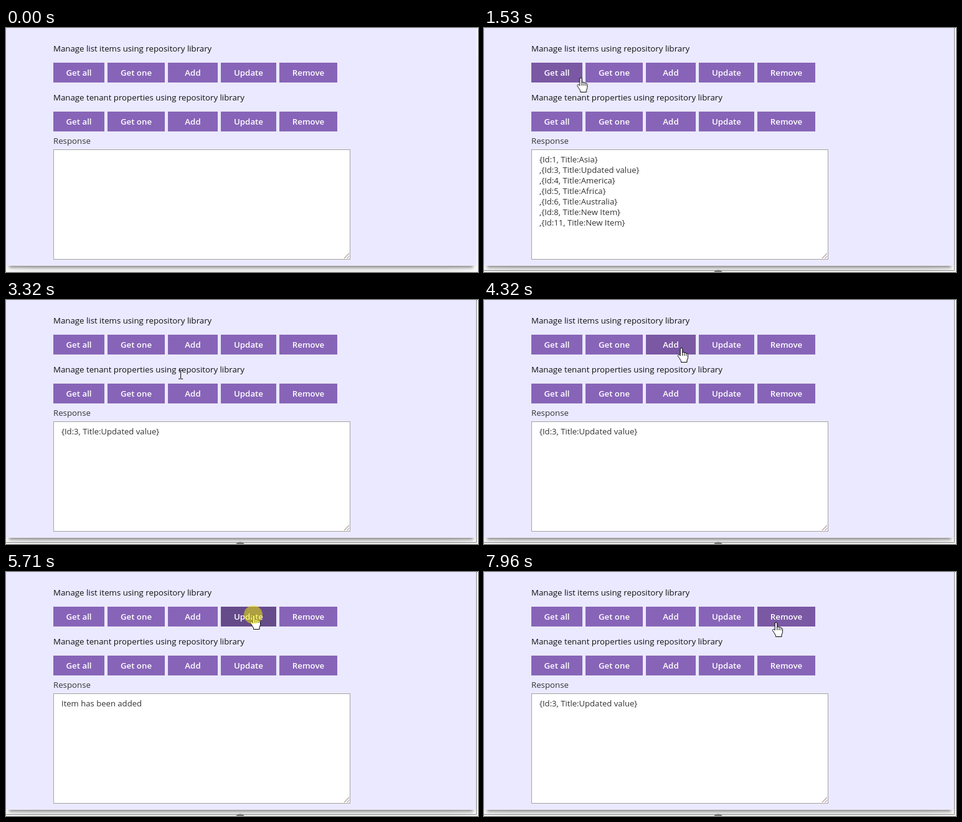
These frames come from a looping animation (758x394 px, 8000 ms). An HTML page:

```html
<!DOCTYPE html>
<html lang="en">
<head>
<meta charset="utf-8">
<title>Repository library demo</title>
<style>
html, body { margin: 0; width: 100%; height: 100%; overflow: hidden; background: #fff; }
body { position: relative; }
svg { position: absolute; left: 0; top: 0; display: block; }
.shade {
  position: absolute; left: 5px; top: -20px; width: 745px; height: 404px;
  box-shadow: 0 3px 5px rgba(0,0,0,.42), 0 25px 50px rgba(0,0,0,.09);
}
text { font: 13.26px "Open Sans", "Noto Sans", sans-serif; fill: #111; white-space: pre; }
.soft, .reply text { fill: #333; }
.reply text { font-size: 13.1px; }
#labels text { font-size: 13.3px; font-weight: 600; fill: #fff; text-anchor: middle; }

/* One 8 s loop: 1% = 80 ms */
.hit { fill: none; animation: 8s step-end infinite; }
.show { visibility: hidden; animation: 8s step-end infinite; }
#all { animation-name: all; }
#one { animation-name: one; }
#add { animation-name: add; }
#update { animation-name: update; }
#remove { animation-name: remove; }
#list { animation-name: list; }
#item { animation-name: item; }
#added { animation-name: added; }
#hand { animation-name: hand; }
#beam { animation-name: beam; }
#arrow { animation-name: arrow; }
#ring { animation-name: ring; }
#plus { animation-name: plus; }
#frame { animation: frame 8s linear infinite; }
#cursor { animation: move 8s linear infinite; }

@keyframes all {
  0%, 20%, 100% { fill: none; }
  5.6%, 14.25% { fill: #7a58a4; }
  12.25% { fill: #664b8b; }
}
@keyframes one {
  0%, 37.7%, 100% { fill: none; }
  27.9%, 31.87% { fill: #7a58a4; }
  29.75% { fill: #664b8b; }
}
@keyframes add {
  0%, 62.6%, 100% { fill: none; }
  48.2%, 54% { fill: #7a58a4; }
  53% { fill: #664b8b; }
}
@keyframes update {
  0%, 86%, 100% { fill: none; }
  68.5%, 72.37% { fill: #7a58a4; }
  71.37% { fill: #664b8b; }
}
@keyframes remove {
  0% { fill: none; }
  98.6%, 100% { fill: #7a58a4; }
}
@keyframes list {
  0%, 33.87%, 100% { visibility: hidden; }
  16.25% { visibility: visible; }
}
@keyframes item {
  0%, 56.87% { visibility: hidden; }
  33.87%, 75.25%, 100% { visibility: visible; }
}
@keyframes added {
  0%, 75.25%, 100% { visibility: hidden; }
  56.87% { visibility: visible; }
}
@keyframes hand {
  0%, 20%, 37.7%, 62.6%, 86% { visibility: hidden; }
  5.6%, 27.9%, 48.2%, 68.5%, 98.6%, 100% { visibility: visible; }
}
@keyframes beam {
  0%, 44%, 100% { visibility: hidden; }
  39.5% { visibility: visible; }
}
@keyframes arrow {
  0%, 20%, 37.7%, 44%, 62.6%, 86% { visibility: visible; }
  5.6%, 27.9%, 39.5%, 48.2%, 68.5%, 98.6%, 100% { visibility: hidden; }
}
@keyframes ring {
  0%, 14.25%, 31.87%, 54%, 72.37%, 100% { visibility: hidden; }
  12.25%, 29.75%, 53%, 71.37% { visibility: visible; }
}
@keyframes plus {
  0% { visibility: hidden; }
  13.5%, 100% { visibility: visible; }
}
@keyframes frame {
  0%, .87% { opacity: 0; stroke: #a8a8a8; }
  4%, 13.49% { opacity: 1; stroke: #a8a8a8; }
  13.5%, 100% { opacity: 1; stroke: #868686; }
}
@keyframes move {
  0%, .87% { transform: translate(215px, -30px); }
  7.5%, 18.2% { transform: translate(143px, 72px); }
  21%, 26.1% { transform: translate(180px, 96px); }
  28.87% { transform: translate(210px, 84px); }
  29.75%, 35.9% { transform: translate(211px, 80px); }
  38.5% { transform: translate(225px, 100px); }
  41.5% { transform: translate(280px, 120px); }
  43.5% { transform: translate(293px, 108px); }
  46.25% { transform: translate(307px, 91px); }
  48.2% { transform: translate(309px, 86px); }
  53%, 60.7% { transform: translate(317px, 77px); }
  63.5% { transform: translate(330px, 98px); }
  66% { transform: translate(358px, 103px); }
  68.5% { transform: translate(384px, 86px); }
  71.37%, 84.1% { transform: translate(398px, 69px); }
  87%, 88% { transform: translate(432px, 96px); }
  89.87%, 97.7% { transform: translate(454px, 96px); }
  99.5%, 100% { transform: translate(469px, 81px); }
}
</style>
</head>
<body>
<div class="shade"></div>
<svg width="758" height="394" viewBox="0 0 758 394">
  <rect width="756" height="384" fill="#ebe9ff"/>
  <path id="frame" d="M0 391.5H755.5V0" fill="none" stroke="#a8a8a8"/>
  <circle id="plus" class="show" cx="376" cy="399" r="8.5" fill="#7c7c7c"/>

  <text x="76" y="38">Manage list items using repository library</text>
  <text x="76" y="117">Manage tenant properties using repository library</text>
  <text x="76" y="187" class="soft">Response</text>

  <path id="bars" fill="#8764b8" d="M76 56h82v32h-82zM163 56h92v32h-92zM260 56h80v32h-80zM345 56h89v32h-89zM439 56h93v32h-93z"/>
  <use href="#bars" y="79"/>
  <rect id="all" class="hit" x="76" y="56" width="82" height="32"/>
  <rect id="one" class="hit" x="163" y="56" width="92" height="32"/>
  <rect id="add" class="hit" x="260" y="56" width="80" height="32"/>
  <rect id="update" class="hit" x="345" y="56" width="89" height="32"/>
  <rect id="remove" class="hit" x="439" y="56" width="93" height="32"/>
  <g id="labels">
    <text x="117" y="77">Get all</text>
    <text x="209" y="77">Get one</text>
    <text x="300" y="77">Add</text>
    <text x="389.5" y="77">Update</text>
    <text x="485.5" y="77">Remove</text>
  </g>
  <use href="#labels" y="79"/>

  <rect x="76.5" y="196.5" width="476" height="177" fill="#fff" stroke="#a3a3a3"/>
  <path d="M543 372l8-8M547.5 372l3.5-3.5" stroke="#8d6a64" fill="none"/>

  <g class="reply">
    <g id="list" class="show">
      <text x="89" y="217">{Id:1, Title:Asia}</text>
      <text x="89" y="234">,{Id:3, Title:Updated value}</text>
      <text x="89" y="251">,{Id:4, Title:America}</text>
      <text x="89" y="268">,{Id:5, Title:Africa}</text>
      <text x="89" y="285">,{Id:6, Title:Australia}</text>
      <text x="89" y="302">,{Id:8, Title:New Item}</text>
      <text x="89" y="319">,{Id:11, Title:New Item}</text>
    </g>
    <text id="item" class="show" x="89" y="217">{Id:3, Title:Updated value}</text>
    <text id="added" class="show" x="89" y="217">Item has been added</text>
  </g>

  <g id="cursor">
    <g id="hand" class="show" stroke="#000" stroke-linejoin="round">
      <path fill="#fff" d="M-1.8 13V2Q-1.8 .5 0 .5T1.8 2V8.5Q2 7 3.6 7.2T5 9Q5.2 7.8 6.6 8.1T8 10Q8.2 9.2 9.3 9.6T10.5 11.5V15.5Q10.5 18 9 20V23.5H-.5V21.5Q-2 19 -3.5 16.5L-5.5 13.6Q-5.8 12 -4.5 11.5T-2.8 12.2Z"/>
      <path fill="none" d="M1.8 8.5V13M5 9.5V13M8 10.5V13"/>
    </g>
    <path id="arrow" class="show" fill="#fff" stroke="#000" d="M.5 .5V16L4 12.7 6.3 18 8.6 17 6.3 11.8H11.2Z"/>
    <path id="beam" class="show" fill="none" stroke="#000" d="M-3 -6.5H0M1 -6.5H4M.5 -6V7M-3 7.5H0M1 7.5H4"/>
    <circle id="ring" class="show" cx="-1" r="15" fill="#f0eb00" fill-opacity=".52"/>
  </g>
</svg>
</body>
</html>
```
